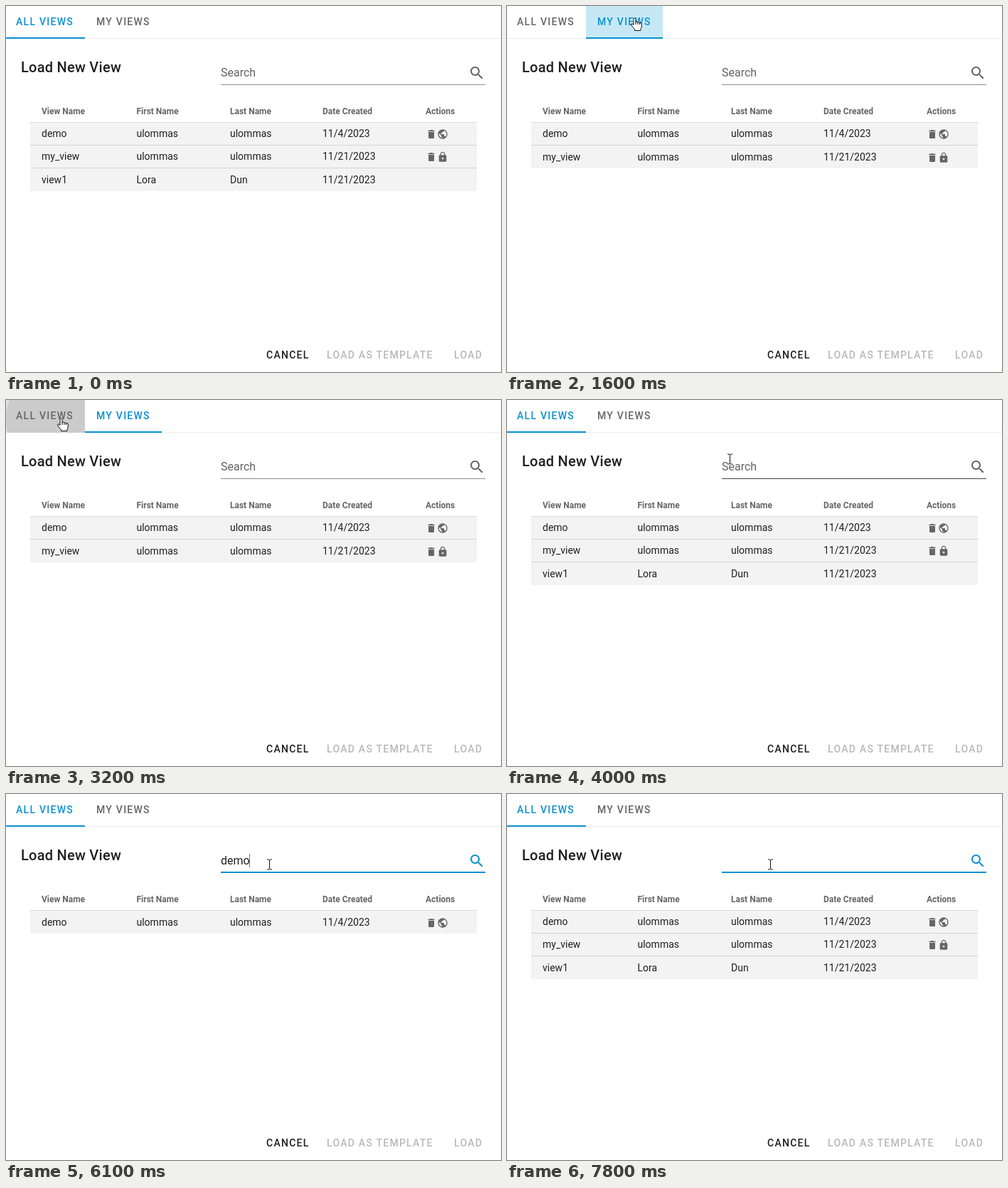
Animation, 696 px wide and 514 px high, one loop 8 s. Source, as an HTML page:

```html
<!DOCTYPE html>
<html lang="en">
<head>
<meta charset="utf-8">
<title>Load New View</title>
<style>
  html, body { margin: 0; width: 100%; height: 100%; overflow: hidden; background: #fff; }
  svg { display: block; font-family: Roboto, Arial, sans-serif; }
  text { white-space: pre; }
  .caps { font-size: 14px; font-weight: 500; letter-spacing: 1.25px; }
  .title { font-size: 20px; font-weight: 500; letter-spacing: .25px; }
  .field { font-size: 16px; }
  .head { font-size: 12px; font-weight: 700; }
  .cell { font-size: 14px; }
</style>
</head>
<body>
<svg id="stage" width="696" height="514" viewBox="0 0 696 514"></svg>
<script>
const LOOP = 8000, STEP = 100;
const BLUE = '#0b90d2', INK = '#202020', GREY = '#666', FAINT = '#b9b9b9';

const ICONS = {
  trash: 'M6 19c0 1.1.9 2 2 2h8c1.1 0 2-.9 2-2V7H6v12zM19 4h-3.5l-1-1h-5l-1 1H5v2h14V4z',
  globe: 'M12 2C6.48 2 2 6.48 2 12s4.48 10 10 10 10-4.48 10-10S17.52 2 12 2zm-1 17.93c-3.95-.49-7-3.85-7-7.93 0-.62.08-1.21.21-1.79L9 15v1c0 1.1.9 2 2 2v1.93zm6.9-2.54c-.26-.81-1-1.39-1.9-1.39h-1v-3c0-.55-.45-1-1-1H8v-2h2c.55 0 1-.45 1-1V7h2c1.1 0 2-.9 2-2v-.41c2.93 1.19 5 4.06 5 7.41 0 2.08-.8 3.97-2.1 5.39z',
  lock: 'M18 8h-1V6c0-2.76-2.24-5-5-5S7 3.24 7 6v2H6c-1.1 0-2 .9-2 2v10c0 1.1.9 2 2 2h12c1.1 0 2-.9 2-2V10c0-1.1-.9-2-2-2zm-6 9c-1.1 0-2-.9-2-2s.9-2 2-2 2 .9 2 2-.9 2-2 2zm3.1-9H8.9V6c0-1.71 1.39-3.1 3.1-3.1s3.1 1.39 3.1 3.1v2z',
  search: 'M15.5 14h-.79l-.28-.27C15.41 12.59 16 11.11 16 9.5 16 5.91 13.09 3 9.5 3S3 5.91 3 9.5 5.91 16 9.5 16c1.61 0 3.09-.59 4.23-1.57l.27.28v.79l5 4.99L20.49 19l-4.99-5zm-6 0C7.01 14 5 11.99 5 9.5S7.01 5 9.5 5 14 7.01 14 9.5 11.99 14 9.5 14z'
};

const COLUMNS = [50, 183.5, 315, 445, 590];
const HEADS = ['View Name', 'First Name', 'Last Name', 'Date Created', 'Actions'];
const ROWS = [
  { cells: ['demo', 'ulommas', 'ulommas', '11/4/2023'], icon: 'globe' },
  { cells: ['my_view', 'ulommas', 'ulommas', '11/21/2023'], icon: 'lock' },
  { cells: ['view1', 'Lora', 'Dun', '11/21/2023'] }
];
const TABS = [
  { label: 'ALL VIEWS', textX: 14, x: -2, w: 113 },
  { label: 'MY VIEWS', textX: 127, x: 111, w: 108 }
];
const PRESSES = [
  { tab: 1, start: 1200, move: 1200, end: 1700, x: 180, y: 21, r: 69 },
  { tab: 0, start: 3100, move: 3200, end: 3500, x: 78, y: 27, r: 78 }
];
const TYPING = [[0, ''], [5100, 'd'], [5200, 'de'], [5400, 'dem'], [6100, 'demo'],
  [6800, 'dem'], [7000, 'de'], [7100, 'd'], [7400, '']];
const POINTER = [[500, 204, 11], [600, 190, 19], [700, 180, 17], [2500, 180, 17],
  [2600, 175, 18], [2700, 140, 25], [2800, 104, 31], [2900, 78, 26], [3800, 78, 26],
  [3900, 170, 50], [4000, 313, 83], [4200, 380, 201], [4500, 370, 99], [8000, 370, 99]];

const stage = document.getElementById('stage');
const ruler = document.createElement('canvas').getContext('2d');
const clamp = v => Math.max(0, Math.min(1, v));
const mix = (a, b, p) => a + (b - a) * p;

const text = (x, y, cls, fill, s) => `<text x="${x}" y="${y}" class="${cls}" fill="${fill}">${s}</text>`;
const rect = (x, y, w, h, fill) => `<rect x="${x}" y="${y}" width="${w}" height="${h}" fill="${fill}"/>`;
const icon = (name, x, y, size, fill) =>
  `<path d="${ICONS[name]}" fill="${fill}" transform="translate(${x} ${y}) scale(${size / 24})"/>`;

function pointerAt(t) {
  if (t < POINTER[0][0]) return null;
  const i = POINTER.findIndex(k => k[0] > t);
  const a = POINTER[i - 1], b = POINTER[i], p = (t - a[0]) / (b[0] - a[0]);
  return { x: mix(a[1], b[1], p), y: mix(a[2], b[2], p) };
}

function tabs(t, active, pointer) {
  const over = pointer && pointer.y < 46 ? +(pointer.x >= 111) : -1;
  const press = PRESSES.filter(p => t >= p.start).pop();
  let out = rect(0, 45, 696, 1, '#ebebeb');

  if (over >= 0) {
    const tab = TABS[over], on = active === over;
    const pressed = press && press.tab === over;
    out += rect(tab.x, 0, tab.w, 45, !pressed ? '#f5f5f5' : on ? '#daf1f9' : '#dfdfdf');
    if (pressed && t < press.end) {
      const r = mix(25, press.r, (t - press.start) / 100);
      out += `<clipPath id="tab">${rect(tab.x, 0, tab.w, 46, '#000')}</clipPath>
        <circle cx="${press.x}" cy="${press.y}" r="${r}" clip-path="url(#tab)"
          fill="${on ? '#9cd4ed' : '#cbcbcb'}" opacity="${clamp((press.end - t) / 300)}"/>`;
    }
  }

  const to = TABS[press ? press.tab : 0], from = TABS[press ? 1 - press.tab : 0];
  const p = press ? 1 - (1 - clamp((t - press.move) / 250)) ** 1.56 : 1;
  out += rect(mix(from.x, to.x, p), 44, mix(from.w, to.w, p), 2, BLUE);
  TABS.forEach((tab, i) => out += text(tab.textX, 27, 'caps', i === active ? BLUE : GREY, tab.label));
  return out;
}

function searchField(t, query, pointer) {
  const focus = clamp((t - 4400) / 200), hover = pointer && inField(pointer);
  let out = rect(302, 110, 372, 1, hover ? '#444' : '#8e8e8e');
  out += icon('search', 650, 82, 24, focus ? BLUE : GREY);
  if (!focus) return out + text(302, 99, 'field', '#626262', 'Search');

  out += rect(488 - 186 * focus, 109, 372 * focus, 2, BLUE);
  out += text(302, 99, 'field', INK, query);
  const blinkedOff = t >= 7800 || (t >= 6800 && t < 7000);
  if (!blinkedOff) {
    ruler.font = '16px Roboto, Arial, sans-serif';
    out += rect(302 + Math.floor(ruler.measureText(query).width), 84, 1, 19, BLUE);
  }
  return out;
}

function table(mine, query) {
  const rows = ROWS.filter(r => (!mine || r.icon) && r.cells.join(' ').toLowerCase().includes(query));
  let out = HEADS.map((s, i) => text(COLUMNS[i], 152, 'head', GREY, s)).join('');
  out += rect(34, 163, 628, 1, '#dcdcdc');
  rows.forEach((row, i) => {
    const top = 164 + 32 * i, last = i === rows.length - 1, dy = +last;
    out += rect(34, top, 628, 32, '#f3f3f3');
    if (!last) out += rect(34, top + 31, 628, 1, '#d3d3d3');
    row.cells.forEach((s, c) => out += text(COLUMNS[c], top + 20 + dy, 'cell', INK, s));
    if (row.icon) {
      out += icon('trash', 590, top + 8 + dy, 16, GREY) + icon(row.icon, 606, top + 8 + dy, 16, GREY);
    }
  });
  return out;
}

function inField(p) {
  return p.x > 300 && p.y > 74 && p.y < 111;
}

function cursor(p) {
  let shape;
  if (p.y < 46) {
    shape = `<path d="M-2 9V1.5Q-2 0-.5 0T1 1.5V6Q1 5 2.5 5T4 6.5Q4 5.7 5.3 5.7T6.6 7Q6.7 6.5 8 6.7T9.2 8V12Q9 14 7.8 15.5V17.5H-.5V15.5Q-2.5 14-5 10Q-6 8.5-5 8T-2 9.5Z" fill="#fff" stroke="#111" stroke-linejoin="round"/>
      <path d="M1 6V9M4 6.5V9M6.6 7V9" stroke="#111" fill="none"/>`;
  } else if (inField(p)) {
    const bar = 'M-3-7H-1L.5-6 2-7H4M.5-6V6M-3 7H-1L.5 6 2 7H4';
    shape = `<path d="${bar}" fill="none" stroke="#fff" stroke-width="3"/>
      <path d="${bar}" fill="none" stroke="#111"/>`;
  } else {
    shape = '<path d="M0 0V15L3.5 12 6 17.5 8.5 16.5 6 11H11Z" fill="#111" stroke="#fff"/>';
  }
  return `<g transform="translate(${Math.round(p.x)} ${Math.round(p.y)})">${shape}</g>`;
}

function render(t) {
  const pointer = pointerAt(t);
  const query = TYPING.filter(k => k[0] <= t).pop()[1];
  const active = t >= 1300 && t < 3300 ? 1 : 0;
  return tabs(t, active, pointer)
    + text(21, 93, 'title', INK, 'Load New View')
    + searchField(t, query, pointer)
    + table(active === 1, query)
    + text(366, 495, 'caps', INK, 'CANCEL')
    + text(451, 495, 'caps', FAINT, 'LOAD AS TEMPLATE')
    + text(630, 495, 'caps', FAINT, 'LOAD')
    + (pointer ? cursor(pointer) : '');
}

let shown = -1;
function tick() {
  const t = Math.floor(performance.now() % LOOP / STEP) * STEP;
  if (t !== shown) stage.innerHTML = render(shown = t);
  requestAnimationFrame(tick);
}
tick();
</script>
</body>
</html>
```
